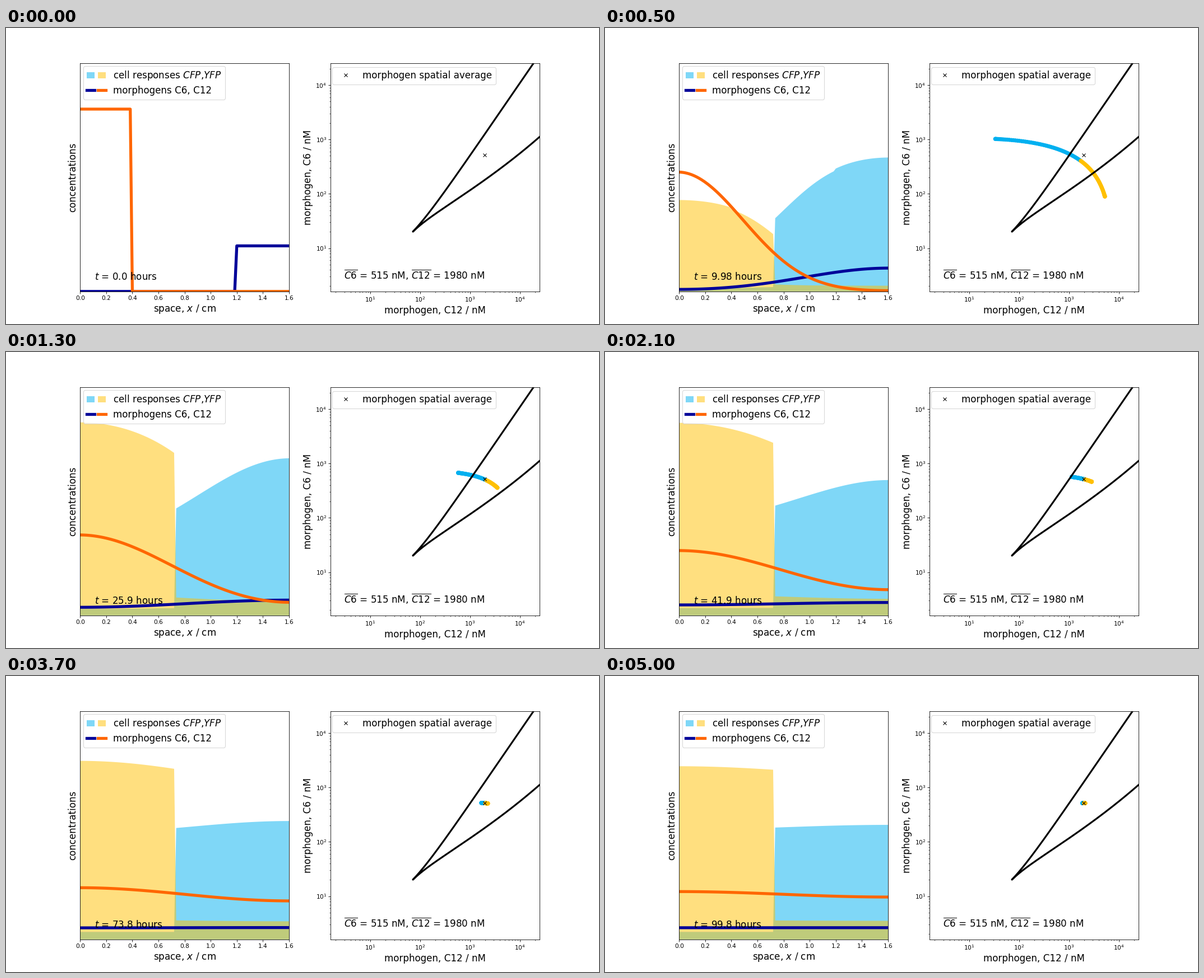
A matplotlib script for the animation above (5.1 s loop, 1058 by 529 pixels).

```python
import numpy as np
import matplotlib.pyplot as plt
from matplotlib.animation import FuncAnimation
from matplotlib.legend_handler import HandlerTuple

FRAMES, INTERVAL = 51, 100
CYAN, YELLOW, NAVY, ORANGE = "#00B0F0", "#FFC000", "#000099", "#FF6600"
FONT = 16

# Diffusion of two morphogens over a row of cells (cm, hours, nM)
CELLS, LENGTH = 101, 1.6
D6, D12 = 0.018, 0.009
DT, STEPS = 0.0064, 312
BORDER = 46
LAG = 2.5
K_CFP, K_YFP = 0.23, 0.23

x = np.linspace(0, LENGTH, CELLS)
dx = x[1] - x[0]
cell = np.arange(CELLS)
is_cyan = cell >= BORDER


def laplacian(c):
    flux = np.diff(c) / dx**2
    out = np.zeros_like(c)
    out[:-1] += flux
    out[1:] -= flux
    return out


def cfp_drive(c6, c12):
    gain = 0.4 + c6 / (c6 + 700)
    return np.where(is_cyan, 8604 * gain / (1 + c12 / 4500), 402 * gain)


def yfp_drive(c12):
    return np.where(is_cyan, 622 + 0.105 * c12, 12100 * c12 / (c12 + 1250))


def cfp_growth(t):
    a = K_CFP * t
    return 1 - np.exp(-a) * (1 + a)


def yfp_growth(t):
    a = K_YFP * t
    return 1 - np.exp(-a) * (1 + a + a**2 / 2)


def simulate():
    c6 = np.where(cell >= 75, 2000.0, 0.0)
    c12 = np.where(cell < 25, 8000.0, 0.0)
    cfp, yfp = cfp_drive(c6, c12), yfp_drive(c12)
    history = []
    for k in range(FRAMES):
        t = k * STEPS * DT
        history.append((t, c6, c12, cfp * cfp_growth(t), yfp * yfp_growth(t)))
        for _ in range(STEPS):
            cfp = cfp + DT / LAG * (cfp_drive(c6, c12) - cfp)
            yfp = yfp + DT / LAG * (yfp_drive(c12) - yfp)
            c6 = c6 + DT * D6 * laplacian(c6)
            c12 = c12 + DT * D12 * laplacian(c12)
    return history


history = simulate()
mean6, mean12 = history[0][1].mean(), history[0][2].mean()

fig, (left, right) = plt.subplots(1, 2, figsize=(14, 7), dpi=75.5715)
fig.subplots_adjust(left=0.125, right=0.9, bottom=0.11, top=0.88, wspace=0.2)


def area_outline(y):
    return np.column_stack([np.r_[x, LENGTH, 0], np.r_[y, 0, 0]])


def add_area(color):
    return left.fill(x, 0 * x, color=color, alpha=0.5, linewidth=0)[0]


def add_legend(ax, handles, labels, corner):
    ax.legend(handles, labels, loc="upper left", bbox_to_anchor=corner,
              borderaxespad=0, labelspacing=0.4, fontsize=FONT,
              handler_map={tuple: HandlerTuple(ndivide=None)})


# Profiles along space
cyan_area, yellow_area = add_area(CYAN), add_area(YELLOW)
line6, = left.plot(x, 0 * x, color=NAVY, lw=5)
line12, = left.plot(x, 0 * x, color=ORANGE, lw=5)
clock = left.text(0.07, 0.0515, "", transform=left.transAxes, fontsize=FONT)
left.set(xlim=(0, LENGTH), ylim=(0, 10000), yticks=[])
left.set_xlabel("space, $x$ / cm", fontsize=FONT)
left.set_ylabel("concentrations", fontsize=FONT)
add_legend(left, [(cyan_area, yellow_area), (line6, line12)],
           ["cell responses $CFP$,$YFP$", "morphogens C6, C12"],
           (0.0141, 0.990))

# Bistable region and the cells in morphogen space
right.set(xscale="log", yscale="log", xlim=(1.6, 25000), ylim=(1.6, 25000))
d = np.linspace(0, 2.7, 200)
upper = 1.335 * d - 0.134 * (1 - np.exp(-d / 0.35))
lower = 0.585 * d + 0.075 * (1 - np.exp(-d / 0.25)) + 0.011 * d**3
cusp12, cusp6 = 1.852, 1.304
boundary = np.r_[upper[::-1], lower[1:]]
right.plot(10 ** (cusp12 + np.r_[d[::-1], d[1:]]), 10 ** (cusp6 + boundary),
           color="black", lw=3)
# Reversed cell order keeps the yellow cells on top
dots = right.scatter(np.ones(CELLS), np.ones(CELLS),
                     c=np.where(is_cyan, CYAN, YELLOW)[::-1])
average, = right.plot(mean12, mean6, "kx", markersize=6)
right.text(0.0628, 0.0535,
           rf"$\overline{{C6}}$ = {mean6:.0f} nM, "
           rf"$\overline{{C12}}$ = {mean12:.0f} nM",
           transform=right.transAxes, fontsize=FONT)
right.set_xlabel("morphogen, C12 / nM", fontsize=FONT)
right.set_ylabel("morphogen, C6 / nM", fontsize=FONT)
add_legend(right, [average], ["morphogen spatial average"], (0.0078, 0.985))


def update(frame):
    t, c6, c12, cfp, yfp = history[frame]
    cyan_area.set_xy(area_outline(cfp))
    yellow_area.set_xy(area_outline(yfp))
    line6.set_ydata(c6)
    line12.set_ydata(c12)
    clock.set_text(f"$t$ = {str(t)[:4]} hours")
    visible = (c6 > 0.1) & (c12 > 0.1)
    points = np.where(visible, [c12, c6], 0.01)
    dots.set_offsets(points.T[::-1])
    return cyan_area, yellow_area, line6, line12, clock, dots


anim = FuncAnimation(fig, update, frames=FRAMES, interval=INTERVAL,
                     repeat=True, repeat_delay=0, blit=False)
plt.show()
```
